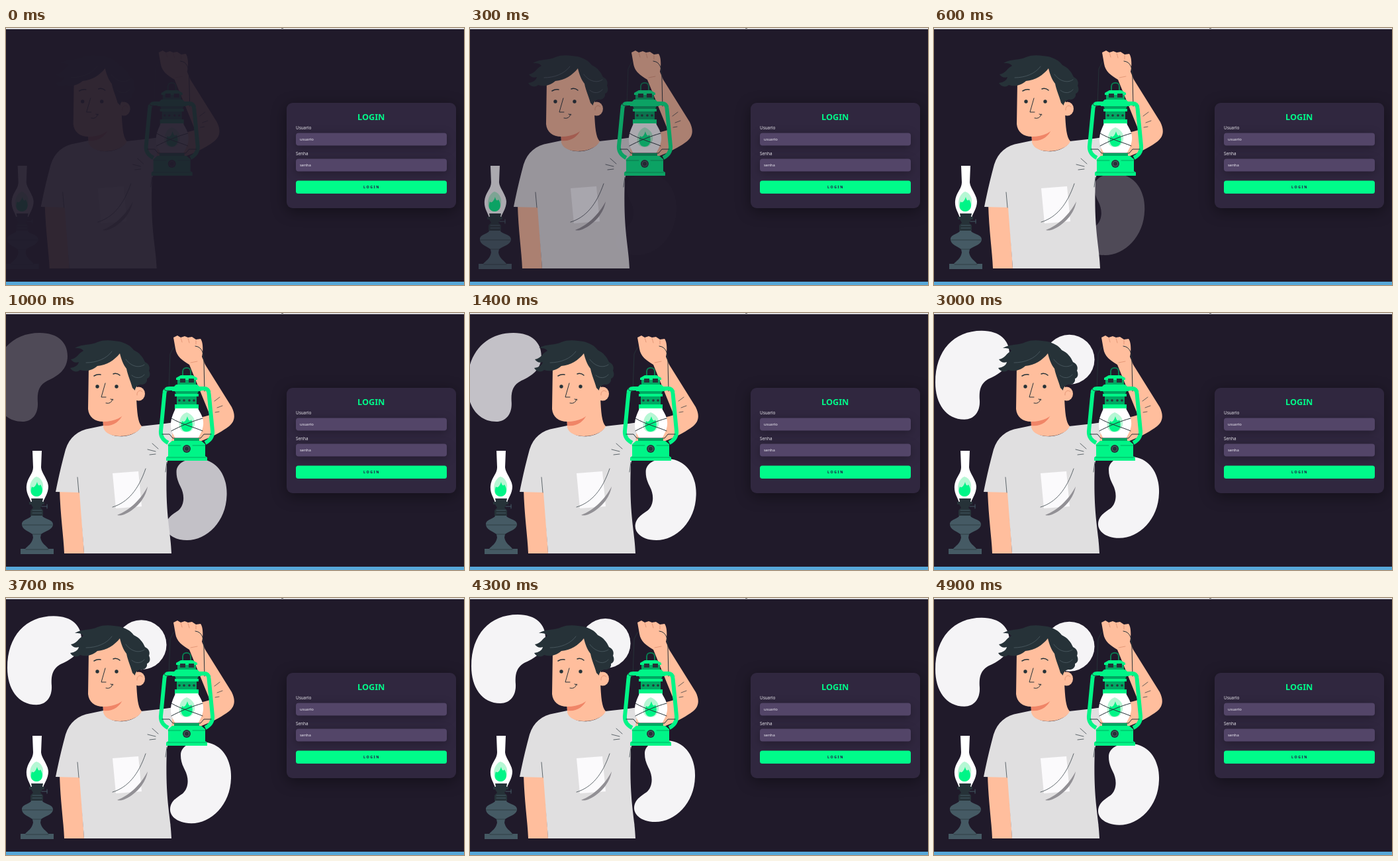
Recreate the animation shown at these times as an HTML page. Size 692 by 388 pixels, loop 5 s.

```html
<!DOCTYPE html>
<html lang="pt">
<head>
<meta charset="utf-8">
<title>Login</title>
<style>
html, body { margin: 0; width: 100%; height: 100%; overflow: hidden; background: #201a2a; }
svg { display: block; width: 692px; height: 388px; }
text { font-family: "Noto Sans", "Open Sans", sans-serif; }
.line { fill: none; stroke: #263238; stroke-width: 1; stroke-linecap: round; stroke-linejoin: round; }
.thin { stroke-width: .7; }
.tube { fill: none; stroke: #00f587; stroke-width: 6; stroke-linejoin: round; }
.skin { fill: #ffbe9d; }
.dark { fill: #263238; }
.green { fill: #00f587; }
.deep { fill: #00a862; }
.iron { fill: #455a64; }
.glow { fill: #b5f7d4; }
.blob { fill: #f5f4f6; }
.label { font-size: 6.35px; fill: #eceaf0; }
.hint { font-size: 5.9px; fill: #f0eef5; }
.card { filter: drop-shadow(0 5px 11px #00000066); }
.field { fill: #534568; filter: drop-shadow(0 3px 7px #00000048); }
</style>
</head>
<body>
<svg viewBox="0 0 692 388">
  <rect width="692" height="388" fill="#201a2a"/>

  <g id="float">
    <path id="blobLow" class="blob" d="M264 240C264 226 279 220 295 220C325 220 341 245 340 275C339 315 310 343 280 343C260 343 248 333 248 322C248 310 258 304 267 298C276 290 277 275 270 262C266 254 264 248 264 240Z"/>
    <path id="blobLeft" class="blob" d="M2 108C2 60 30 30 72 30C100 30 114 45 114 65C114 85 100 95 84 102C70 109 68 120 69 135C70 153 60 164 46 164C18 164 2 140 2 108Z"/>
    <ellipse id="blobTop" class="blob" cx="204.500" cy="73.500" rx="38" ry="37.500"/>
  </g>

  <g id="man">
    <!-- table lamp -->
    <path fill="#fff" d="M40 208H54L53 233C54 243 63 250 64 262C64 272 58 279 56 286H38C36 279 30 272 31 261C32 249 41 243 41 233Z"/>
    <path class="glow" d="M46 247C53 249 57 256 56 264C55 274 51 277 46 277C39 277 36 271 36 264C36 257 40 249 46 247Z"/>
    <path class="green" d="M47 255C48 260 50 262 52 259C57 266 56 276 47 277C38 277 36 270 39 262C41 265 45 262 47 255Z"/>
    <path class="dark" d="M38 280H56L55 285H58V289H55L52 294L56 298V306H37V298L41 294L38 289H35V285H39Z"/>
    <path class="line" style="stroke:#455a64" d="M54 292H62M62 289V295M40 298H54M40 302H54"/>
    <path class="iron" d="M38 306H55C56 311 71 311 71 319C71 327 58 330 53 334L52 339C54 349 61 351 64 356H72V364H22V356H29C33 351 39 349 41 339L40 334C35 330 24 327 24 319C24 311 37 311 38 306Z"/>
    <path class="line thin" d="M25 320H70M40 334H53M30 357H64"/>

    <!-- hanging arm -->
    <path class="skin" d="M81 266H112L118 363H88C87 338 82 305 81 266Z"/>

    <!-- raised arm -->
    <path class="skin" d="M253 37L259 34L264 37L270 35L275 37L281 36L287 40L294 39C298 44 298 58 296 66L301 78L341 142C347 154 346 164 337 171C316 187 282 200 244 208L250 166C270 163 288 160 308 154L277 78C266 71 258 66 256 54Z"/>
    <path class="line thin" style="stroke:#d98969" d="M264 37L266 44M275 38L277 45M287 41L287 47M279 75L289 73"/>
    <path class="line thin" d="M315 133L323 127M319 143L327 140M316 150L322 149"/>

    <!-- shirt -->
    <path fill="#e0dfe0" d="M147 170L128 174C108 177 96 188 90 206C84 228 79 250 75 270L111 271L118 363H250C249 329 240 306 243 228L247 213L254 165L240 167L204 171C198 188 154 195 147 170Z"/>
    <path class="line thin" d="M110 271L108 248M221 197L230 205M214 206L226 209M217 214L226 213M243 225L241 240"/>
    <path fill="#fbfafc" d="M161 242L200 239L205 292L166 295Z"/>
    <path class="line thin" d="M161 293C184 286 200 267 211 235"/>
    <path fill="#929095" d="M168 305C187 298 204 281 214 262C211 279 198 295 181 303C175 306 171 306 168 305Z"/>

    <!-- head -->
    <path class="skin" d="M146 156L147 173C152 192 197 189 205 171C199 165 198 149 197 128L150 130Z"/>
    <path fill="#f08567" d="M147 160C157 164 170 160 177 152C172 165 160 172 147 170Z"/>
    <path class="skin" d="M125 80L124 145C125 157 134 164 147 164C164 164 178 157 185 146L198 128V82L170 55Z"/>
    <ellipse class="skin" cx="200.500" cy="122" rx="9.500" ry="10.500"/>
    <path class="line thin" style="stroke:#d98969" d="M198 124C197 118 203 115 206 119"/>
    <path class="dark" d="M97 83C104 82 109 79 110 74C105 76 101 74 98 70C107 69 109 61 117 57C114 53 110 53 104 53C116 46 129 49 138 44C150 39 163 42 171 43C180 45 188 49 193 56C202 60 207 67 210 74C216 77 218 82 216 87C219 93 217 98 213 99C214 105 209 109 203 108C198 109 195 113 195 117L191 113C188 102 184 94 182 84C177 78 174 69 172 61C164 71 152 79 138 80C130 87 120 89 112 86C108 90 100 89 97 83Z"/>
    <path class="line thin" style="stroke:#54646b" d="M121 75C137 75 152 69 160 58M181 70C190 82 202 83 209 78M190 94C197 100 205 98 209 93"/>
    <circle class="dark" cx="138" cy="111" r="2.700"/>
    <circle class="dark" cx="167" cy="111" r="2.700"/>
    <path class="line" style="stroke-width:1.500" d="M133 95Q138 92 143 93M162 92Q167 90 172 94"/>
    <path class="line" d="M150 106L144 127L151 127M151 136Q159 138 161 130M158 130L162 131"/>

    <!-- lantern -->
    <path class="line" d="M246 118L248 62L253 52M286 50C296 51 299 60 299 75L300 118"/>
    <path class="line" style="stroke:#087b50;stroke-width:2" d="M267 95V88C267 81 279 81 279 88V95"/>
    <path class="green" d="M257 98L264 94H282L289 98V101H257Z"/>
    <path class="deep" d="M259 101H287V110H259Z"/>
    <path class="dark" d="M263 99H271V105H263ZM276 99H284V105H276Z"/>
    <path class="green" d="M257 108H289L295 114V118H251V114Z"/>
    <path class="tube" d="M254 114H247Q240 114 239.500 121L234 178Q233 190 245 196M292 114H299Q306 114 306.500 121L312 178Q313 190 301 196"/>
    <path class="deep" d="M255 118H291L288 124V139H258V124Z"/>
    <path class="green" d="M255 122H291V126H255ZM255 138H291V145H255Z"/>
    <g class="dark"><circle cx="262" cy="132" r="1.800"/><circle cx="269" cy="132" r="1.800"/><circle cx="277" cy="132" r="1.800"/><circle cx="284" cy="132" r="1.800"/></g>
    <path fill="#fff" d="M256 144H290C294 152 299 158 298 169C297 178 293 184 289 191H257C253 184 249 178 249 169C249 158 253 152 256 144Z"/>
    <path class="glow" d="M273 150C281 153 287 160 285 169C283 177 278 180 273 180C265 180 260 174 262 165C263 157 267 152 273 150Z"/>
    <path class="green" d="M274 156C276 163 278 164 280 161C284 170 281 179 273 179C265 179 263 171 266 163C269 166 272 163 274 156Z"/>
    <path class="line" d="M250 159C265 168 283 172 297 178M297 159C282 163 263 171 250 178M236 183H247L252 189H294L299 183H310"/>
    <path class="deep" d="M254 189H292V196H254Z"/>
    <path class="green" d="M251 193H295L301 198V216L304 218V223H242V218L245 216V198Z"/>
    <path class="line thin" style="stroke:#008b50" d="M245 200H264M282 200H301M244 218H302"/>
    <circle class="dark" cx="273" cy="205" r="6"/>
    <circle cx="273" cy="205" r="3.800" fill="none" stroke="#607078" stroke-width=".8"/>
    <path class="line" d="M241 112C237 115 241 119 245 117"/>
  </g>

  <!-- form -->
  <rect class="card" x="424" y="113" width="256" height="159" rx="9" fill="#30273f"/>
  <text x="551.700" y="138.500" text-anchor="middle" font-size="12.700" font-weight="700" fill="#00fb8a">LOGIN</text>
  <text class="label" x="438" y="152.500">Usuario</text>
  <rect class="field" x="438" y="158.500" width="228" height="19" rx="4"/>
  <text class="hint" x="444" y="170">usuario</text>
  <text class="label" x="438" y="191.800">Senha</text>
  <rect class="field" x="438" y="197.500" width="228" height="19" rx="4"/>
  <text class="hint" x="444" y="209">senha</text>
  <rect x="438" y="230.500" width="228" height="19.500" rx="3.500" fill="#00fb8a"/>
  <text x="540" y="242.400" font-size="5.200" font-weight="800" letter-spacing="1.600" fill="#201040">LOGIN</text>

  <rect width="692" height="1.700" fill="#f4f4f6"/>
  <rect x="416" width="3" height="1" fill="#777"/>
  <rect y="383" width="692" height="5" fill="#57a8d9"/>
</svg>
<script>
const LOOP = 5000, STEP = 100;
const FLOAT = { start: 1870, period: 1500, rise: 6.5 };
// id, start ms, duration ms, slide distance px
const slides = [
  ["man", -140, 1000, 24],
  ["blobLow", 230, 1500, 28],
  ["blobLeft", 630, 1500, 27],
  ["blobTop", 1400, 1500, 25],
];
const $ = id => document.getElementById(id);
const curve = (s, a, b) => 3 * (1 - s) ** 2 * s * a + 3 * (1 - s) * s * s * b + s ** 3;

function ease(x) {
  if (x <= 0) return 0;
  if (x >= 1) return 1;
  let lo = 0, hi = 1;
  for (let i = 0; i < 24; i++) {
    const mid = (lo + hi) / 2;
    if (curve(mid, .36, .5) < x) lo = mid; else hi = mid;
  }
  return curve(lo, -.01, 1.38);
}

function draw(t) {
  for (const [id, start, duration, distance] of slides) {
    const p = ease((t - start) / duration);
    $(id).setAttribute("transform", `translate(${(p - 1) * distance} 0)`);
    $(id).setAttribute("opacity", Math.max(0, Math.min(1, p)));
  }
  const phase = Math.max(0, t - FLOAT.start) / FLOAT.period % 1;
  const lift = FLOAT.rise * (1 - Math.abs(1 - 2 * phase));
  $("float").setAttribute("transform", `translate(0 ${-lift})`);
}

function tick() {
  const t = performance.now() % LOOP;
  draw(Math.floor(t / STEP) * STEP);
  requestAnimationFrame(tick);
}
draw(0);
requestAnimationFrame(tick);
</script>
</body>
</html>
```
